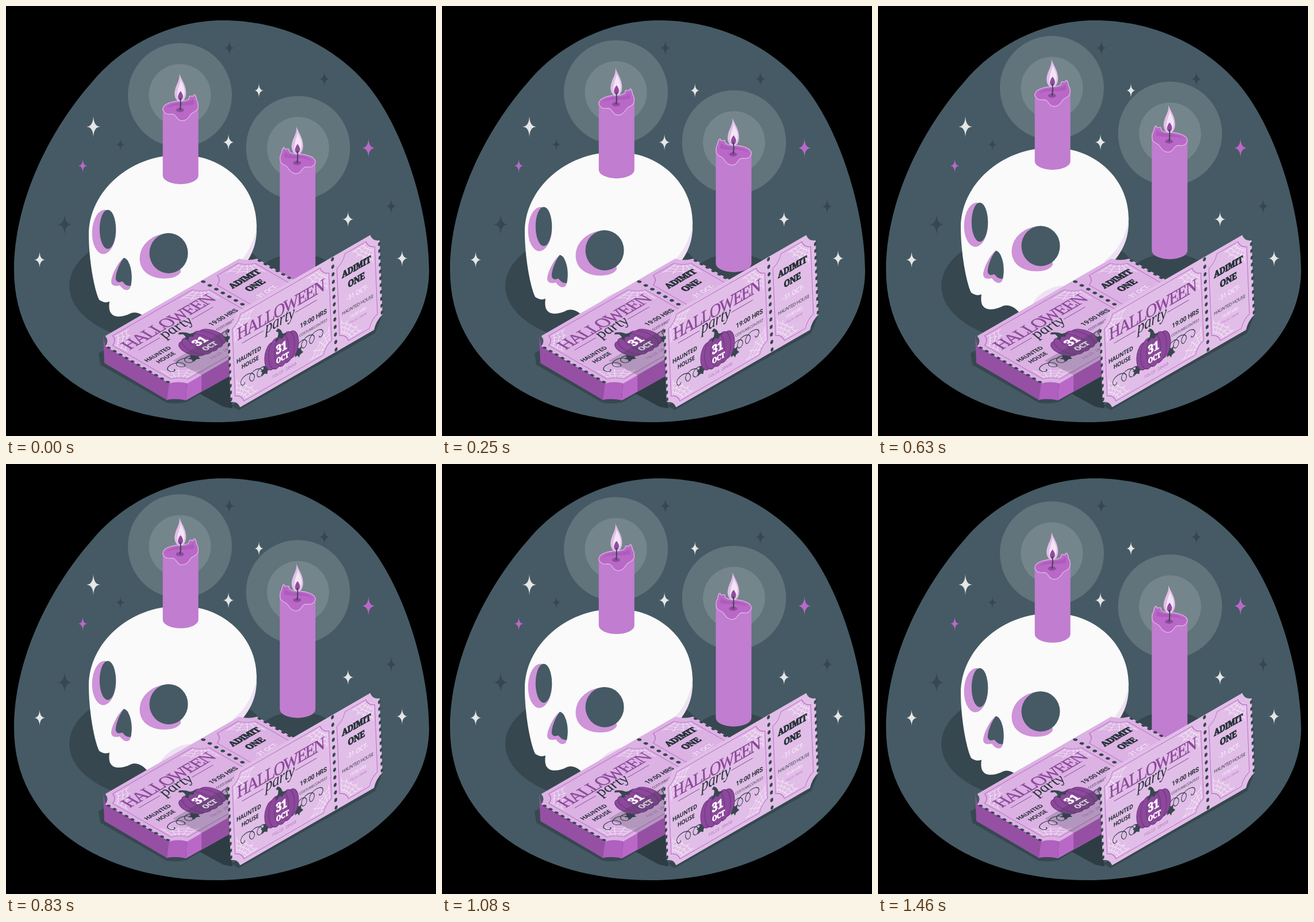
These frames come from a looping animation (748 by 748 pixels, 1500 ms). An HTML page with a canvas:

```html
<!DOCTYPE html>
<html lang="en">
<head>
<meta charset="utf-8">
<title>Halloween tickets</title>
<style>
html, body { margin: 0; width: 100%; height: 100%; overflow: hidden; background: #000; }
canvas { display: block; width: 100vw; height: 100vh; }
</style>
</head>
<body>
<canvas id="stage" width="748" height="748"></canvas>
<script>
const ctx = document.getElementById('stage').getContext('2d');
const LOOP = 1500, STEPS = 36, PHASE = 31;
const SLATE = '#455a64', DARK = '#37474f', INK = '#263238';
const PURPLE = '#ba68c8', DEEP = '#9550a4', LILAC = '#ce93d8', PALE = '#e1bee7';
const SERIF = '"Noto Serif", serif', SANS = '"Open Sans", sans-serif';

function fill(path, color) {
  ctx.fillStyle = color;
  ctx.fill(new Path2D(path));
}
function stroke(path, color, width) {
  ctx.strokeStyle = color;
  ctx.lineWidth = width;
  ctx.stroke(new Path2D(path));
}
function ellipse(x, y, rx, ry, color, turn = 0) {
  ctx.beginPath();
  ctx.ellipse(x, y, rx, ry, turn, 0, Math.PI * 2);
  ctx.fillStyle = color;
  ctx.fill();
}
function shifted(x, y, draw) {
  ctx.save();
  ctx.translate(x, y);
  draw();
  ctx.restore();
}
function text(label, x, y, font, color, spacing = 0, heavy = 0) {
  ctx.font = font;
  ctx.fillStyle = color;
  ctx.textAlign = 'center';
  ctx.letterSpacing = spacing + 'px';
  ctx.fillText(label, x, y);
  if (!heavy) return;
  ctx.strokeStyle = color;
  ctx.lineWidth = heavy;
  ctx.strokeText(label, x, y);
}

// Background
function star(x, y, w, h, color) {
  ctx.beginPath();
  ctx.moveTo(x, y - h);
  for (const [px, py, sx, sy] of [[w, 0, 1, -1], [0, h, 1, 1], [-w, 0, -1, 1], [0, -h, -1, -1]]) {
    ctx.quadraticCurveTo(x + sx * w * .03, y + sy * h * .02, x + px, y + py);
  }
  ctx.fillStyle = color;
  ctx.fill();
}
function backdrop() {
  ctx.fillStyle = '#000';
  ctx.fillRect(0, 0, 748, 748);
  fill('M377 25C475 25 565 65 625 133C690 207 736 355 736 460C736 610 555 724 365 724C165 724 14 625 14 460C14 340 75 217 150 132C205 66 290 25 377 25Z', SLATE);
  const groups = {
    '#e6e6e6': [[152, 210, 12, 19], [440, 147, 8, 13], [387, 237, 10, 14.5], [595, 371, 10, 14], [689, 439, 10, 14.5], [58.5, 441.5, 10, 14.5]],
    [PURPLE]: [[133.5, 278, 8, 12], [630.5, 247, 12, 17]],
    [DARK]: [[388.5, 73, 9.5, 14], [554, 127, 9.5, 14], [199, 241, 7.5, 11], [102, 380, 13, 19], [670, 348.5, 9.5, 14]]
  };
  for (const color in groups) for (const s of groups[color]) star(...s, color);
}
function halo(x, y) {
  ellipse(x, y, 90.5, 90.5, 'rgba(255,255,255,.15)');
  ellipse(x, y, 54, 54, 'rgba(255,255,255,.13)');
}

function skull() {
  fill('M144 398C144 325 212 259 303 259C380 259 436 315 436 382C436 430 410 460 375 490L290 570L246 546C238 536 228 531 218 534Q205 541 193 540C181 538 178 529 180 514Q172 518 162 511C153 492 144 440 144 398Z', '#fafafa');
  fill('M436 388C436 420 424 442 404 464L394 456C416 440 428 418 436 388Z', '#efe1f3');
  ellipse(302, 524, 38, 19, '#efe1f3', -.5);
  ellipse(170.5, 393, 20.8, 38.5, LILAC, .04);
  ellipse(177, 388.5, 14.2, 34, SLATE);
  fill('M283 395C255 396 232 415 232.5 440C233 462 252 474 275 474Q297 474 304 463L300 410Z', LILAC);
  ellipse(283, 430, 33.5, 35, SLATE);
  fill('M205 438C194 446 184 468 183 479C183 487 190 488 198 486C203 493 210 497 215 492C220 486 219 465 215 450Q211 439 205 438Z', LILAC);
  fill('M205 438C196 449 190 468 191 476Q194 483 202 479C206 482 207 487 217 487C220 475 219 460 215 450Q211 439 205 438Z', SLATE);
}

// Candle with its top centred on the origin; side = -1 mirrors the rim.
function candle(x, y, height, side) {
  shifted(x, y, () => {
    ctx.save();
    ctx.scale(side, 1);
    fill(`M-31 0V${height - 15}A31 15 0 0 0 31 ${height - 15}V-8L0 -4Z`, '#c17dd0');
    const rim = 'M-31 0C-31 -10 -15 -14 0 -15C8 -15 14 -17 15 -20C14 -26 20 -22 22 -23C24 -30 27 -23 28 -16C31 -13 31 -6 30 -2C27 6 20 3 16 11C11 19 4 21 -1 19C-8 17 -7 8 -15 8C-23 9 -28 8 -31 0Z';
    fill(rim, PURPLE);
    fill('M-25 -2Q-19 -11 2 -12Q18 -12 22 -19L24 -9Q12 -6 -4 -7Q-17 -7 -25 -2Z', '#ac5dba');
    stroke(rim, '#dcb1e4', 1.4);
    ctx.restore();
    ellipse(-1, 1, 7, 3.7, '#914b9f');
    fill('M-2 -62C2 -51 9 -43 9.5 -30C10 -20 5 -14 0 -13C-7 -14 -11 -21 -10.5 -29C-9 -43 -1 -49 -2 -62Z', PALE);
    fill('M0 -53C2 -45 8 -39 7 -28Q5 -16 0 -15C-6 -17 -7 -25 -5 -32C-4 -40 0 -45 0 -53Z', '#f3e5f5');
    fill('M0 -32C3 -28 5 -24 4 -21Q3 -16 -1 -16C-5 -18 -5 -22 -4 -25Q-3 -29 0 -32Z', '#914b9f');
    stroke('M-1 1Q1 -8 -.5 -20', DARK, 2);
  });
}

// Tickets, drawn in flat units and placed with isometric matrices
const W = 305, H = 165;

function notched(x, y, w, h, r) {
  const right = x + w, bottom = y + h, c = r * .75;
  ctx.beginPath();
  ctx.moveTo(x + r, y);
  ctx.lineTo(right - r, y);
  ctx.quadraticCurveTo(right - c, y + c, right, y + r);
  ctx.lineTo(right, bottom - r);
  ctx.quadraticCurveTo(right - c, bottom - c, right - r, bottom);
  ctx.lineTo(x + r, bottom);
  ctx.quadraticCurveTo(x + c, bottom - c, x, bottom - r);
  ctx.lineTo(x, y + r);
  ctx.quadraticCurveTo(x + c, y + c, x + r, y);
  ctx.closePath();
}
function frame(x, w) {
  notched(x, 7, w, H - 14, 17);
  ctx.strokeStyle = PURPLE;
  ctx.lineWidth = 1.1;
  ctx.stroke();
}
function web(x, y, sx, sy) {
  const arms = [[42, 2], [34, 14], [22, 24], [13, 33], [2, 40]];
  shifted(x, y, () => {
    ctx.scale(sx, sy);
    ctx.beginPath();
    for (const [ax, ay] of arms) {
      ctx.moveTo(ax * .35, ay * .35);
      ctx.lineTo(ax, ay);
    }
    for (const k of [.5, .7, .9]) {
      arms.forEach(([ax, ay], i) => {
        if (!i) return ctx.moveTo(ax * k, ay * k);
        const [bx, by] = arms[i - 1];
        ctx.quadraticCurveTo((ax + bx) * k * .43, (ay + by) * k * .43, ax * k, ay * k);
      });
    }
    ctx.strokeStyle = 'rgba(255,255,255,.7)';
    ctx.lineWidth = .9;
    ctx.stroke();
  });
}
function dots(x, from, to, count, rx = 3, ry = 3.3) {
  for (let i = 0; i < count; i++) ellipse(x, from + (to - from) * i / (count - 1), rx, ry, DARK);
}
function leaf(x, y, turn) {
  shifted(x, y, () => {
    ctx.rotate(turn);
    fill('M8 -7L7 0L10 3L4 4L3 9L-2 6L-9 8L-6 2L-10 -2L-4 -3L-4 -8L2 -5Z', DARK);
  });
}
function tendril(y) {
  stroke(`M72 ${y}c-14 -8 -22 4 -16 10s14 -6 4 -12s-26 0 -20 10s14 -4 4 -10s-26 -2 -22 8c2 5 8 4 7 0`, DARK, 1.3);
}
function pumpkin() {
  tendril(121);
  ctx.save();
  ctx.translate(208, 0);
  ctx.scale(-1, 1);
  tendril(115);
  ctx.restore();
  leaf(71, 126, 0);
  leaf(137, 128, 1.2);
  for (const [dx, rx, ry] of [[-20, 14, 23], [20, 14, 23], [-11, 15, 26], [11, 15, 26], [0, 14, 27]]) {
    ellipse(104 + dx, 109, rx, ry, '#8c489b');
    ctx.strokeStyle = '#703980';
    ctx.lineWidth = 1.3;
    ctx.stroke();
  }
  fill('M92 86Q99 84 99 75L94 71L98 68Q105 72 107 81L117 86L110 86L106 90L101 86L95 90Z', DARK);
  text('31', 104, 111, `900 20px ${SERIF}`, '#fff', -.3, 1.3);
  text('OCT', 105, 127, `900 12.5px ${SERIF}`, '#fff', -.3, .8);
}
function ticket(color, ...matrix) {
  ctx.save();
  ctx.transform(...matrix);
  notched(0, 0, W, H, 18);
  ctx.fillStyle = color;
  ctx.fill();
  frame(9, 194);
  frame(219, 76);
  web(12, 10, 1, 1);
  web(200, 10, -1, 1);
  web(12, 155, 1, -1);
  web(200, 155, -1, -1);
  web(292, 10, -1, 1);
  web(222, 155, 1, -1);
  dots(1, 24, 143, 11, 2.4, 3.2);
  dots(211, 4, 161, 13);
  dots(W - 1, 24, 143, 11, 2.6, 3.2);

  text('HALLOWEEN', 105, 49, '31px "Liberation Serif", serif', '#8d489c', -2.3, .5);
  text('party', 103, 65, 'italic 29px "Liberation Serif", serif', INK, -.5);
  stroke('M27 58H70M134 58H177', '#86439a', .9);
  text('19:00 HRS', 169, 90, 'bold 11.5px Roboto, sans-serif', INK, -.1);
  text('COSTUMECONTEST', 168, 104, `6.4px ${SANS}`, INK, -.1);
  text('HAUNTED', 39, 88, `bold 10.5px ${SANS}`, INK, -.3);
  text('HOUSE', 41, 102, `bold 10.5px ${SANS}`, INK, -.3);
  pumpkin();
  text('FOLIO 20450', 108, 148, '7.2px "Noto Sans Mono", monospace', PURPLE);

  text('ADIMIT', 257, 46, `900 15.5px ${SERIF}`, INK, -.6, 1.1);
  text('ONE', 256, 68, `900 15.5px ${SERIF}`, INK, -.4, 1.1);
  stroke('M232 74H283M232 94H283', PALE, .8);
  text('-31 OCT-', 257, 89, `11px ${SANS}`, '#fff', -.1);
  text('HAUNTED HOUSE', 257, 109, `8px ${SANS}`, INK, -.3);
  text('19:00 HRS', 257, 122, `7px ${SANS}`, '#fff');
  text('FOLIO 20450', 257, 131, '5px "Noto Sans Mono", monospace', PURPLE);
  ctx.restore();
}
function stack() {
  fill('M161 604L174 597L300 630L346 670L314 689Q297 693 279 690L164 624Z', DARK);
  fill('M336 674L388 644L394 700L378 697Z', '#2e3c43');
  fill('M169 573L173 592V622L171 620Z', DEEP);
  fill('M172 591L285 656L281 686L171 621Z', DEEP);
  fill('M284 655Q300 647 315 655L313 686Q297 682 280 685Z', '#b060bf');
  fill('M315 656L392 612V642L313 686Z', PURPLE);
  ticket('#dbb2e3', .866, -.5, .866, .5, 157, 583);
  fill('M290 617L388 560V614L340 642Z', 'rgba(38,50,56,.22)');
  fill('M340 642L392 612V642L340 671Z', DEEP);
}
function standing() {
  fill('M392 695L405 703L642 569L654 540Z', DARK);
  ticket(PALE, .866, -.5, .04, 1, 385, 542);
}

function draw(time) {
  const step = Math.min(STEPS - 1, Math.floor((time + 5) * STEPS / LOOP));
  const phase = (step * LOOP / STEPS + PHASE) % LOOP;
  const lift = (PHASE - Math.min(phase, LOOP - phase)) * .02;

  backdrop();
  halo(302.5, 155 + lift);
  halo(508, 247 + lift * 2);
  ellipse(285, 487, 175, 100, DARK);
  ellipse(508, 470, 70, 39, DARK);
  shifted(0, lift, skull);
  candle(303.7, 180 + lift * 2, 130, 1);
  candle(507.3, 272 + lift * 3, 206, -1);
  stack();
  standing();
}
function tick() {
  draw(performance.now() % LOOP);
  requestAnimationFrame(tick);
}
tick();
</script>
</body>
</html>
```
